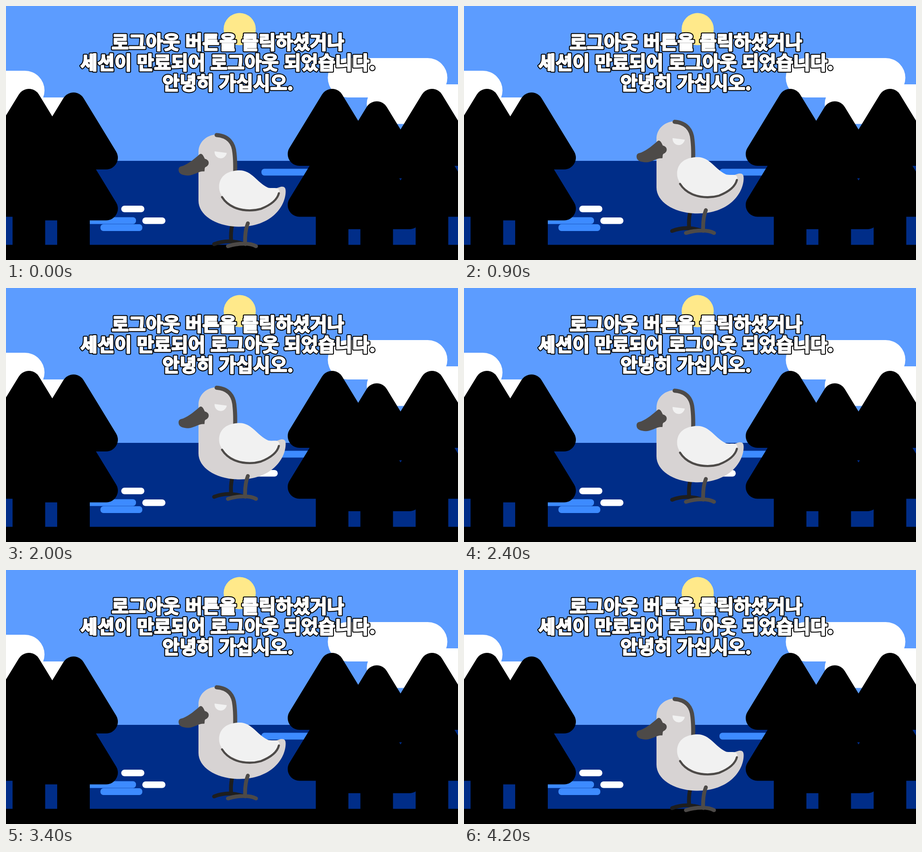
An HTML page that plays this animation: 998 by 561 pixels, repeating every 4300 ms.

```html
<!DOCTYPE html>
<html lang="ko">
<head>
<meta charset="utf-8">
<title>로그아웃</title>
<style>
  html, body { margin: 0; width: 100%; height: 100%; overflow: hidden; background: #000; }
  svg { display: block; }
  text { font: 900 41px "Noto Sans CJK KR", "Noto Sans CJK JP", sans-serif; text-anchor: middle; }
  .outline { stroke: #000; stroke-width: 6.4; stroke-linejoin: round; }
  .face { fill: #fff; stroke: #fff; stroke-width: 2.4; stroke-linejoin: round; }
  .line { fill: none; stroke-linecap: round; stroke-linejoin: round; }
</style>
</head>
<body>
<svg width="998" height="561" viewBox="0 0 998 561">
  <defs>
    <!-- Tree with its tip at the origin -->
    <g id="tree" stroke="#000" stroke-width="52" stroke-linejoin="round">
      <path id="tier" d="M0 26L72 144H-72Z"/>
      <use href="#tier" y="112.5"/>
      <path d="M-36 250H36V360H-36Z" stroke="none"/>
    </g>
    <g id="message">
      <text x="490" y="94.5">로그아웃 버튼을 클릭하셨거나</text>
      <text x="490" y="139.5">세션이 만료되어 로그아웃 되었습니다.</text>
      <text x="490" y="184.5">안녕히 가십시오.</text>
    </g>
  </defs>

  <rect width="998" height="561" fill="#5c9cff"/>
  <circle cx="516" cy="51" r="35.5" fill="#ffe98a"/>
  <g fill="#fff">
    <rect x="-120" y="143" width="205" height="87" rx="43.5"/>
    <rect x="-60" y="202" width="200" height="60" rx="10"/>
    <rect x="710.5" y="115" width="264" height="87" rx="43.5"/>
    <rect x="796.5" y="173" width="290" height="87.5" rx="43.5"/>
  </g>

  <rect y="342" width="998" height="186" fill="#002d88"/>
  <g fill="#3d8bff">
    <rect x="564" y="359.5" width="130" height="15" rx="6.5"/>
    <rect x="150" y="466.5" width="137" height="15" rx="6.5"/>
    <rect x="208.5" y="482" width="92.5" height="15" rx="6.5"/>
  </g>
  <g fill="#fff">
    <rect x="254.5" y="441" width="51" height="14.5" rx="7.2"/>
    <rect x="301" y="467" width="51" height="14.5" rx="7.2"/>
    <rect x="549" y="402" width="51" height="14.5" rx="7.2"/>
  </g>

  <use href="#tree" x="50.5" y="183"/>
  <use href="#tree" x="149" y="191"/>
  <use href="#tree" x="720" y="183"/>
  <use href="#tree" x="818.5" y="210.5"/>
  <use href="#tree" x="940.5" y="183"/>
  <rect y="527.5" width="998" height="34"/>

  <use href="#message" class="outline"/>
  <use href="#message" class="face"/>

  <g id="duck">
    <path class="line" stroke="#1e1e1e" stroke-width="8.5" d="M500 482C497 493 496 503 497 517M459.500 526C480 518 502 518 523 525"/>
    <path fill="#d7d3d3" d="M464 284C442 285 425 301 425 323V430C425 462 464 487.500 516 487.500C584 487.500 617.500 444 617.500 409C617.500 400 613 398 606 399.500L580 408L506 366V325C505 300 490 284 464 284Z"/>
    <path class="line" stroke="#4d4a48" stroke-width="9" d="M465 285C492 287 503 304 504.500 325Q506.500 342 506 366"/>
    <path fill="#4d4a48" d="M428 327C433 324.500 436 331 439 337.500C450 340 450 351 442 355C437 357 439.500 361 438 365.500C426 364 416 374 402 374.500C390 374 381 371 381 362C381 354.500 386 354.500 391 353C405 347 418 336 428 327Z"/>
    <path fill="#f1f1f1" d="M460.500 321L487.500 324.500C486 332 480 336.500 474 336.500C466 336 460 330 460.500 321Z"/>
    <path fill="#f1f1f1" d="M516 363C543 363 555 391 579 401.500C586 403 592 401.500 598 402.500C606 405 604 412 600 418C590 439 564 449.500 537 449.500C508 449 470.500 428 470.500 400C470.500 375 490 363 516 363Z"/>
    <path class="line" stroke="#4d4a48" stroke-width="4.600" d="M477 422C490 443 514 451.500 538 451.500C548 451.500 556 450 563 448C583 440 599 428 602.500 413.500"/>
    <path class="line" stroke="#4d4a48" stroke-width="8.5" d="M534 480C528 495 527.500 510 528 526M490 530.500C514 523 540 523.500 552 530.500"/>
  </g>
</svg>
<script>
  const duck = document.getElementById('duck');
  const STEP = 100, STEPS = 43, TOP = 21, RISE = 68;

  // Steady climb to the top, then the same way back
  function draw() {
    const step = Math.floor(performance.now() / STEP) % STEPS;
    const height = RISE * (1 - Math.abs(step - TOP) / TOP);
    duck.setAttribute('transform', `translate(0 ${-height})`);
    requestAnimationFrame(draw);
  }
  draw();
</script>
</body>
</html>
```
